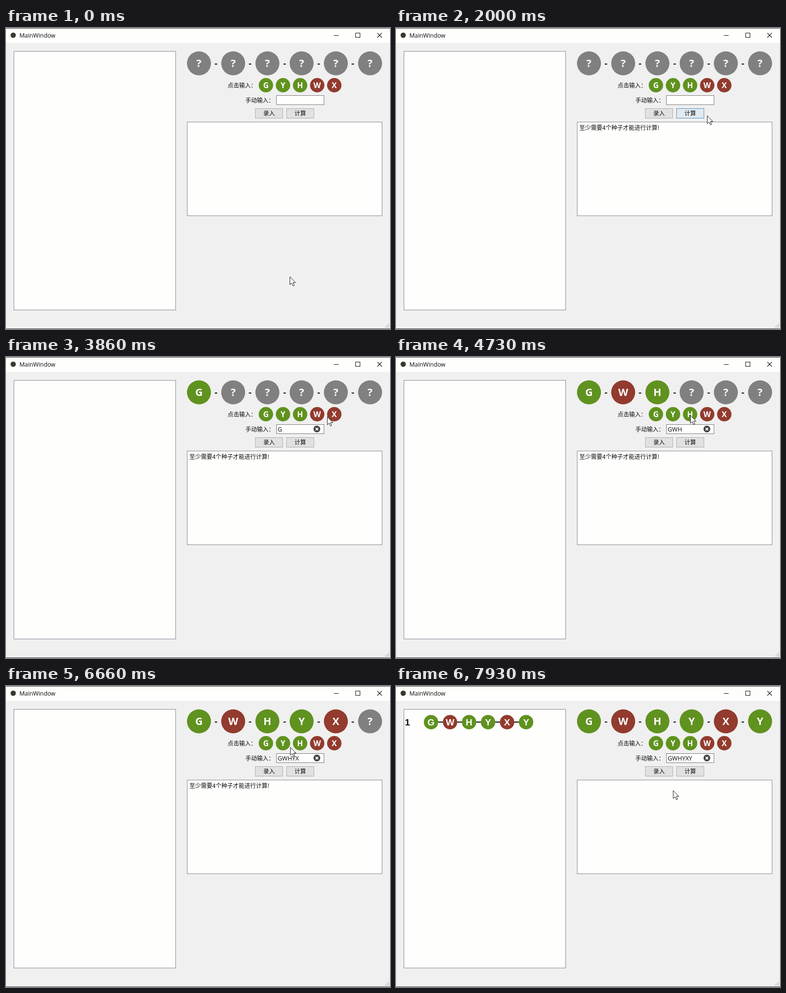
An HTML page with a canvas for the animation above (8000 ms loop, 800x626 px).

```html
<!DOCTYPE html>
<html lang="zh-CN">
<head>
<meta charset="utf-8">
<title>MainWindow</title>
<style>
html, body { margin: 0; width: 100%; height: 100%; overflow: hidden; background: #f0f0f0; }
canvas { display: block; }
</style>
</head>
<body>
<canvas id="stage" width="800" height="626"></canvas>
<script>
const ctx = document.getElementById('stage').getContext('2d');
const LOOP = 8000;
const UI = '"Open Sans", "Noto Sans CJK SC", sans-serif';
const CJK = '"Noto Sans CJK SC", "Noto Sans CJK", sans-serif';
const ROW = '"Liberation Sans", Arial, sans-serif';
const C = {
  bg: '#f0f0f0', paper: '#fefefd', ink: '#0a0a0a', edge: '#828790',
  gray: '#808080', green: '#60921f', brown: '#923b2e'
};

const KEYS = 'GYHWX', SEQ = 'GWHYXY';
const CLICKS = [3500, 4240, 4700, 5080, 5860, 6860];
const WARN = 1530, SAVE = 7560;
const FIELD = [563, 140, 100, 20];
const BUTTONS = [['录入', 519, 167, 58, 21], ['计算', 584, 167, 58, 21]];
const keyX = s => 541.5 + KEYS.indexOf(s) * 35.6;

// Pointer stops as time, x, y; each clicked letter adds a short rest
const STOPS = [
  [0, 591, 517], [940, 550, 179], [1170, 607, 181], [1560, 609, 181],
  [2060, 650, 182], [2860, 600, 152], [3860, 669, 124], [4000, 669, 124],
  [5460, 665, 124], [5660, 666, 124], [6660, 592, 127],
  [7400, 548, 180], [7540, 548, 181], [7930, 577, 217]
];
const PATH = STOPS.concat(
  ...CLICKS.map((t, i) => [-70, 70].map(d => [t + d, keyX(SEQ[i]), 121]))
).sort((a, b) => a[0] - b[0]);

function pointer(t) {
  const i = PATH.findIndex(p => p[0] > t);
  if (i < 1) return PATH[i < 0 ? PATH.length - 1 : 0].slice(1);
  const [t0, x0, y0] = PATH[i - 1], [t1, x1, y1] = PATH[i];
  const u = (t - t0) / (t1 - t0), e = u * u * (3 - 2 * u);
  return [x0 + (x1 - x0) * e, y0 + (y1 - y0) * e];
}

const inside = ([px, py], [x, y, w, h]) => px >= x && px <= x + w && py >= y && py <= y + h;

// Share of the last 200 ms spent over a box, used as the hover fade
function hover(t, area) {
  let n = 0;
  for (let i = 0; i < 20; i++) n += inside(pointer(t - i * 10), area);
  return n / 20;
}

const mix = (a, b, u) => `rgb(${a.map((v, i) => Math.round(v + (b[i] - v) * u))})`;

function text(s, x, y, font, color = C.ink, align = 'left') {
  ctx.font = font;
  ctx.fillStyle = color;
  ctx.textAlign = align;
  ctx.fillText(s, x, y);
}

function box(x, y, w, h, fill, stroke) {
  ctx.fillStyle = fill;
  ctx.fillRect(x, y, w, h);
  ctx.strokeStyle = stroke;
  ctx.lineWidth = 1;
  ctx.strokeRect(x + .5, y + .5, w - 1, h - 1);
}

function line(x0, y0, x1, y1, color = C.ink, width = 1) {
  ctx.beginPath();
  ctx.moveTo(x0, y0);
  ctx.lineTo(x1, y1);
  ctx.strokeStyle = color;
  ctx.lineWidth = width;
  ctx.stroke();
}

function cross(x, y, r, color, width) {
  line(x - r, y - r, x + r, y + r, color, width);
  line(x - r, y + r, x + r, y - r, color, width);
}

function disc(x, y, r, color) {
  ctx.beginPath();
  ctx.arc(x, y, r, 0, Math.PI * 2);
  ctx.fillStyle = color;
  ctx.fill();
}

function gene(s, x, y, r, size, family = UI) {
  disc(x, y, r, s === '?' ? C.gray : 'WX'.includes(s) ? C.brown : C.green);
  text(s, x, y + size * .357, `bold ${size}px ${family}`, '#fff', 'center');
}

function drawFrame() {
  ctx.fillStyle = C.bg;
  ctx.fillRect(0, 0, 800, 626);
  ctx.fillStyle = C.paper;
  ctx.fillRect(0, 0, 800, 31);
  line(0, .5, 800, .5, '#3a3a3a');
  line(0, 625.5, 800, 625.5, '#3a3a3a');
  disc(15, 15, 5.5, '#333c2c');
  text('MainWindow', 28, 19.5, `12.3px ${UI}`);
  line(683, 15.5, 693, 15.5);
  ctx.strokeRect(728.5, 10.5, 9, 9);
  cross(778.3, 15.2, 4.8, C.ink, 1.1);
  ctx.fillStyle = '#bfbfbf';
  for (let i = 0; i < 3; i++)
    for (let j = 2 - i; j < 3; j++) ctx.fillRect(790 + j * 3, 615 + i * 3, 2, 2);
}

function drawList(saved) {
  box(16, 48, 338, 539, C.paper, C.edge);
  if (!saved) return;
  text('1', 18.5, 82, `bold 19px ${ROW}`);
  line(73, 75, 271, 75, C.ink, 2);
  [...SEQ].forEach((s, i) => gene(s, 73 + i * 39.6, 75.2, 15, 19, ROW));
}

function drawInputs(t, pos, typed) {
  [...typed.padEnd(6, '?')].forEach((s, i) => {
    const x = 402 + i * 71.3;
    gene(s, x, 73.5, 25, 21.5);
    if (i < 5) line(Math.round(x + 33), 75, Math.round(x + 38), 75, C.ink, 2);
  });
  text('点击输入：', 461.8, 123.5, `12px ${CJK}`);
  [...KEYS].forEach(s => gene(s, keyX(s), 119, 15, 16));

  text('手动输入：', 498.8, 154.5, `12px ${CJK}`);
  box(...FIELD, C.paper, inside(pos, FIELD) ? '#171717' : '#7a7a7a');
  if (typed) {
    text(typed, 566, 154.5, `12.5px ${UI}`);
    disc(647.7, 149.8, 7, '#404040');
    cross(647.7, 149.8, 2.7, C.paper, 2);
  }

  for (const [label, ...area] of BUTTONS) {
    const u = hover(t, area);
    box(...area, mix([225, 225, 225], [229, 241, 251], u), mix([173, 173, 173], [0, 120, 215], u));
    text(label, area[0] + 29, 182, `12px ${CJK}`, C.ink, 'center');
  }
}

function drawPointer([x, y], beam) {
  x = Math.round(x) + .5;
  y = Math.round(y) + .5;
  if (beam) {
    line(x, y - 7, x, y + 7);
    for (const d of [-7, 7]) line(x - 3.5, y + d, x + 3.5, y + d);
    return;
  }
  const shape = [[0, 0], [0, 16.5], [3.8, 13], [6.4, 19], [9, 17.9], [6.5, 12], [11.6, 12]];
  ctx.beginPath();
  shape.forEach(([dx, dy]) => ctx.lineTo(x + dx, y + dy));
  ctx.closePath();
  ctx.fillStyle = '#fff';
  ctx.fill();
  ctx.strokeStyle = '#1a1a1a';
  ctx.lineWidth = 1;
  ctx.stroke();
}

function draw(t) {
  const pos = pointer(t);
  drawFrame();
  drawList(t >= SAVE);
  drawInputs(t, pos, SEQ.slice(0, CLICKS.filter(c => t >= c).length));
  box(377, 195, 407, 196, C.paper, C.edge);
  if (t >= WARN && t < SAVE) text('至少需要4个种子才能进行计算!', 382, 212, `12px ${CJK}`);
  drawPointer(pos, inside(pos, FIELD));
}

// The screen updates 15 times a second, aligned to 10 ms
function stepTime(t) {
  const k = Math.ceil(3 * (Math.floor(t / 10) + 1) / 20) - 1;
  return Math.floor(k * 20 / 3) * 10;
}

const start = performance.now();
function tick() {
  draw(stepTime((performance.now() - start) % LOOP));
  requestAnimationFrame(tick);
}
tick();
</script>
</body>
</html>
```
